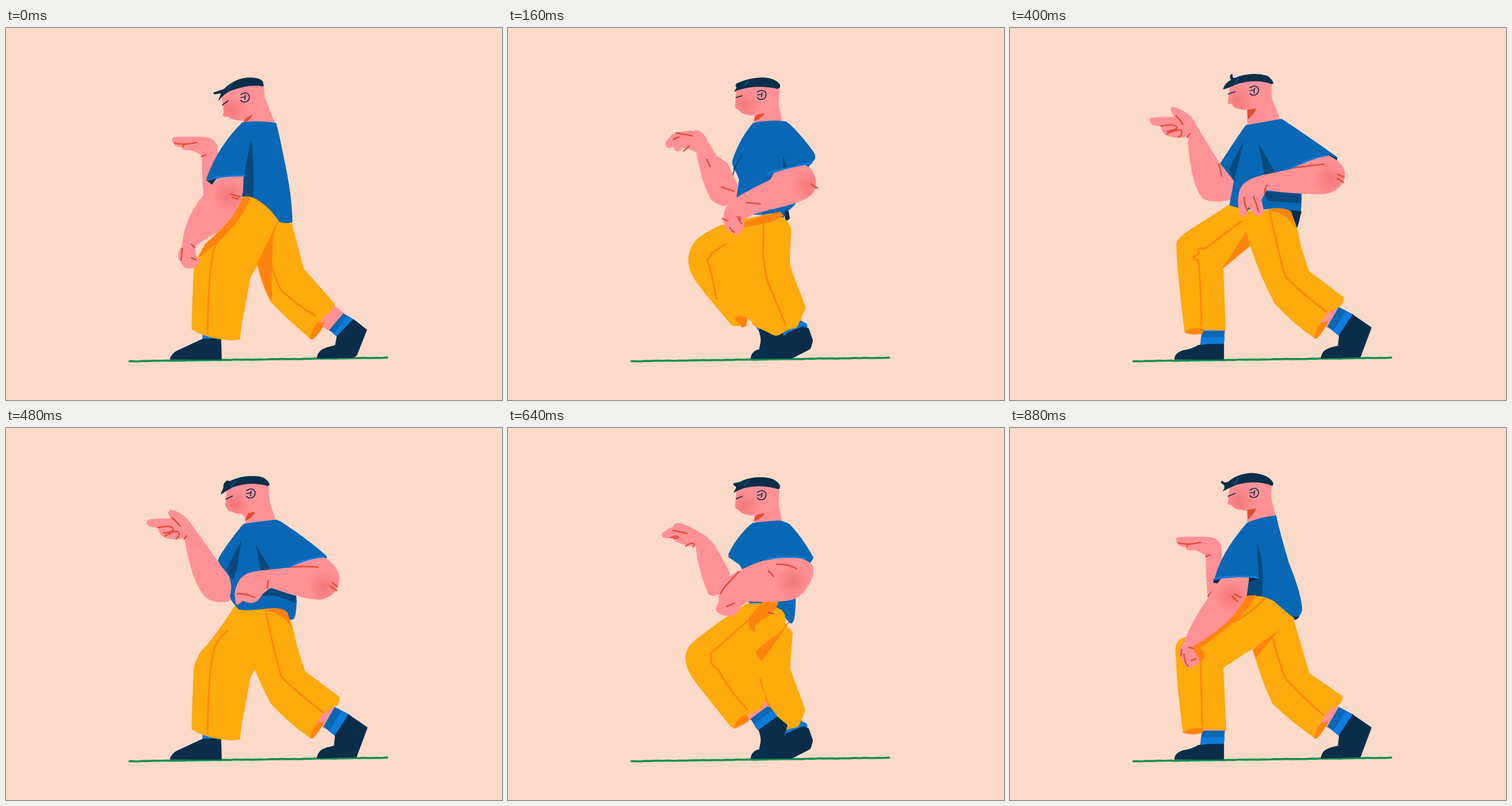
Write an HTML page with a canvas that moves like this. It is 864x648 px and loops after 960 ms.

```html
<!DOCTYPE html>
<html lang="en">
<head>
<meta charset="utf-8">
<title>Walk cycle</title>
<style>
html, body { margin: 0; width: 100%; height: 100%; overflow: hidden; background: #fbdac9; }
canvas { display: block; width: 864px; height: 648px; }
</style>
</head>
<body>
<canvas id="stage" width="864" height="648"></canvas>
<script>
const ctx = document.getElementById('stage').getContext('2d');
const STEP = 80;
const C = {
  paper: '#fbdac9', skin: '#fe9196', red: '#e44b35', blue: '#0868b6', dark: '#084a7e',
  light: '#0e7bdb', navy: '#0a2e4a', yellow: '#fcaa0c', orange: '#ff840e', green: '#12914e'
};

// Feet, by phase of the step
const plant = {
  ankle: 'M336,516L374,516L374,530L336,530Z', sock: 'M335,528L373,528L372,552L332,553Z',
  stripe: 'M334,540L373,539L372,552L332,553Z',
  shoe: 'M287,577Q288,566 302,562Q318,560 328,553L350,551L372,551L372,577Z'
};
const flat = {
  stripe: 'M343,532L374,532L373,543L343,543Z',
  shoe: 'M286,577Q290,566 300,562L343,542L374,541L375,577Z'
};
const push = {
  ankle: 'M532,508L553,475L577,490L556,523Z', sock: 'M554,520L573,487L598,500L575,537Z',
  stripe: 'M564,528L585,494L598,500L575,537Z',
  shoe: 'M542,575Q544,561 560,557L572,554L574,535L597,500L629,522L610,573Z'
};
const pushLow = {
  ...push, ankle: 'M532,508L558,474L588,497L564,527Z', sock: 'M564,526L588,498L604,508L578,538Z',
  stripe: 'M572,532L595,502L604,508L578,538Z',
  shoe: 'M542,575Q544,561 560,557L574,553L577,537L605,508L628,526L611,569Q607,574 602,574Z'
};
const strip = 'M410,530L455,530L455,537L411,537Z';
const stand = {
  ankle: strip, sock: strip, stripe: strip,
  shoe: 'M338,576Q339,565 350,563L374,562L411,537L454,536L454,576Z'
};
const swing = {
  ankle: 'M472,484L496,448L526,467L502,504Z', sock: 'M501,503L525,468L542,477L516,516Z',
  stripe: 'M509,509L533,473L542,477L516,516Z',
  shoe: 'M545,574Q546,563 550,558L516,514L542,478L569,486L568,574Z'
};
const swingLow = {
  ...swing, ankle: 'M472,484L496,448L518,461L494,497Z', sock: 'M494,496L517,461L542,477L516,514Z',
  stripe: 'M504,504L528,467L542,477L516,514Z'
};
const reach = {
  ankle: 'M348,509L390,501L391,512L351,521Z', sock: 'M353,518L391,510L396,530L358,539Z',
  stripe: 'M355,529L394,520L396,530L358,539Z',
  shoe: 'M321,576Q322,563 334,560L349,557Q356,553 358,538L396,529L404,549Q393,566 378,576Z'
};
const trail = {
  ankle: 'M526,512L558,480L572,488L540,519Z', sock: 'M538,517L571,489L587,504L553,537Z',
  stripe: 'M546,527L579,496L587,504L553,537Z',
  shoe: 'M509,575Q510,562 524,557L548,551L554,536L586,504L607,529L577,574Z'
};

// Heads
const headLow = {
  skin: 'M376,115L380,148L378,152Q381,155 386,153Q395,162 415,160L416,167L468,167L450,120L448,98Q415,88 390,104Z',
  chin: 'M415,164Q416,158 420,157L428,152Q425,160 415,164Z',
  hair: 'M371,125Q377,112 374,113L363,115L362,113L380,107Q400,87 425,87Q442,87 447,94L448,101Q425,96 390,109Q378,115 371,125Z',
  shine: 'M387,107L394,97', eye: 'M377,134L387,127', ear: [416, 121], blush: [393, 143]
};
const headMid = {
  skin: 'M387,112L385,149Q388,152 391,150Q396,157 420,157L422,166L469,166L459,132L460,99Q420,92 386,112Z',
  chin: 'M421,163L423,159L438,152Q435,161 421,163Z',
  hair: 'M380,120Q385,113 380,111Q395,99 410,94Q445,83 460,99L458,103Q420,99 395,110Q385,114 380,120Z',
  shine: 'M395,106L402,99', eye: 'M385,128L397,124', ear: [427, 118], blush: [399, 138]
};
const headNod = {
  ...headMid,
  hair: 'M378,123Q385,109 374,108L374,106Q385,105 389,100Q405,87 440,88Q455,91 459,101L457,104Q425,96 395,108Q384,115 378,123Z',
  eye: 'M386,133L397,126', ear: [427, 119], blush: [400, 141]
};
const headBack = {
  skin: 'M411,97L407,131Q410,133 413,131Q416,146 440,147L436,170L487,166L482,132Q485,118 485,103Q455,90 420,94Z',
  chin: 'M437,160L439,148L454,146Q445,155 437,160Z',
  hair: 'M410,100L416,93L411,90L411,88Q430,83 455,84Q483,87 488,103L486,108Q465,100 440,99Q420,99 410,100Z',
  shine: 'M428,95L435,85', eye: 'M409,114L419,112', ear: [456, 115], blush: [424, 129]
};
const headUp = {
  skin: 'M384,101L380,131Q383,133 386,131Q390,142 414,142L414,173L471,162L455,122L455,95Q425,84 396,94Z',
  chin: 'M415,158L414,143L428,141Q424,150 415,158Z',
  hair: 'M372,106Q376,95 386,91Q382,84 386,81L387,81Q386,87 391,88Q420,76 448,84Q457,91 458,96L456,97Q430,87 395,97Q380,104 372,106Z',
  shine: 'M391,98L398,87', eye: 'M380,115L392,111', ear: [425, 109], blush: [397, 126]
};
const headLift = {
  ...headUp,
  skin: 'M383,101L380,132Q383,135 386,133Q390,143 414,143L414,168L463,156L454,122L455,97Q425,86 396,94Z',
  hair: 'M372,109Q378,100 369,96Q367,93 370,93Q373,98 381,94Q395,81 420,79Q452,81 458,97L457,100Q430,89 395,98Q378,105 372,109Z',
  eye: 'M380,119L392,114', ear: [425, 113], blush: [400, 127]
};

const palmUp = {
  skin: 'M342,222Q328,212 318,212Q308,214 306,207Q292,206 293,199Q287,196 292,191Q330,189 350,191Q362,193 367,205L368,215L372,280L345,293Q342,260 342,222Z',
  lines: 'M293,200Q310,205 332,199M308,207Q308,203 315,202M341,224L348,221M345,293L365,272'
};

const contactNear = {
  farArm: palmUp,
  farLeg: {
    ...pushLow,
    cuff: 'M530,541Q533,524 543,513L555,513Q548,530 534,542Z',
    pants: 'M474,334Q485,342 497,340Q505,370 518,420L545,450L572,481L569,488L543,514Q535,525 531,541Q497,513 462,477Q446,448 438,410Z',
    shade: 'M466,352L438,410Q448,450 462,474Q461,410 466,352Z',
    seam: 'M462,405Q462,420 478,455Q505,482 539,501'
  },
  head: headLow,
  body: {
    shirt: 'M412,165Q440,161 470,166Q474,180 484,230Q498,295 498,338Q485,341 474,336Q455,320 431,300L408,295L414,258L353,268L350,262Q371,205 412,165Z',
    dark: 'M427,197Q432,240 430,296L410,292Q416,250 427,197Z',
    navy: 'M350,265L367,261L362,274Z', hem: 'M352,265Q370,257 416,257'
  },
  nearLeg: {
    ...flat,
    pants: 'M408,296Q418,292 430,296Q455,308 474,336L436,415L425,434L413,500Q408,525 407,542Q395,545 370,541Q340,535 324,524Q325,480 328,415Q335,398 340,390Q370,358 408,296Z',
    shade: 'M408,298L424,294Q420,320 380,362Q360,380 338,398Q342,378 360,366Q392,340 408,298ZM474,336L467,355L437,412L464,357Z',
    seam: 'M386,353Q364,370 360,395Q352,440 351,533'
  },
  nearArm: {
    skin: 'M367,263Q390,257 413,259L412,285Q409,305 400,318Q388,338 371,352L329,379L330,398Q337,402 336,408Q332,412 329,415Q322,420 312,417Q306,413 306,405Q301,405 301,398Q301,388 307,381Q311,340 331,310Q340,295 346,292Z',
    lines: 'M307,384L305,405M323,377L329,382M323,400L331,404M391,289L407,294M394,295L404,298',
    blush: [389, 292]
  }
};

const passNear = {
  farArm: {
    skin: 'M345,225Q330,212 320,212Q308,214 307,207Q293,206 295,200Q289,196 295,192Q330,189 350,191Q365,197 370,215L383,248L404,252L402,300L368,316Q351,290 345,225Z',
    lines: 'M294,200Q310,204 335,198M309,207Q310,203 316,202M341,224L351,222M382,249L388,277M367,315L397,300'
  },
  farLeg: {
    ...swing,
    cuff: 'M465,486L475,483L486,496Q478,510 466,519Z',
    pants: 'M350,375Q313,392 314,412Q316,430 330,441L368,469L467,518L474,484L505,449L504,444L466,416L400,370Z',
    shade: 'M466,416L471,432L464,475Z', seam: 'M376,393L362,432'
  },
  head: headMid,
  body: {
    shirt: 'M421,163Q445,160 472,163Q480,190 491,235L497,260Q507,300 505,322Q504,334 498,337L478,330L440,340L400,335L398,300L403,260Q402,200 421,163Z',
    dark: 'M405,218Q388,232 384,248L403,251ZM485,237L497,268L494,295Z',
    navy: 'M405,278L428,270L430,288L398,300ZM480,318L487,330L478,328Z', hem: 'M404,274Q440,263 485,261'
  },
  nearLeg: {
    ...stand,
    pants: 'M365,358L480,326L493,338L472,390Q465,410 466,440L467,531L378,533Q373,532 373,525L369,468L362,430L376,393L345,395Z',
    shade: 'M379,371L386,354L480,325L493,333Q470,345 440,354Q410,364 379,371ZM376,393L362,430L367,468Q366,430 376,393Z',
    seam: 'M438,352Q432,390 422,405Q423,460 430,531'
  },
  nearArm: {
    skin: 'M428,270Q460,262 484,260Q493,280 492,298Q490,318 465,327L390,352L361,365Q355,375 345,385L358,393Q361,398 356,402Q345,403 335,403Q329,402 328,390Q319,372 326,362Q335,340 355,330Q390,308 430,288Z',
    lines: 'M326,364L322,376M329,384Q330,398 334,403M337,382L344,384M344,398L348,393M358,360L363,364M474,302L483,314M477,300L491,308',
    blush: [474, 300]
  }
};

const reachFar = {
  farArm: {
    skin: 'M313,207Q295,203 283,200L284,214Q280,218 273,214L272,205L264,213Q257,214 257,208L266,186L252,190Q245,189 248,182Q265,169 293,166Q287,158 294,155Q308,153 315,161Q345,205 376,238L405,265L400,297Q375,308 352,301Q330,280 313,207Z',
    lines: 'M292,165Q303,167 307,178M268,182L280,178M271,204L280,190M311,209L316,205M377,239L389,268'
  },
  farLeg: {
    ...reach,
    cuff: 'M326,525Q335,516 352,515L356,523Z',
    pants: 'M395,312L330,340Q286,362 284,392Q285,410 300,455L326,524L353,515L398,508L366,410L419,383L425,315Z',
    shade: 'M404,333L420,381L367,410Q390,370 404,333Z',
    seam: 'M401,346L338,379Q333,388 336,391Q322,392 325,400Q345,440 364,511'
  },
  head: headBack,
  body: {
    shirt: 'M434,169Q460,161 490,163Q530,170 578,208L577,216L498,234L505,245L497,290L494,335L489,341L485,318Q470,308 425,316L397,312L404,265L377,238Q400,195 434,169Z',
    dark: 'M412,222L399,264L383,242ZM474,215L482,250L470,252ZM465,284L497,283L497,298L462,288Z',
    navy: 'M560,212L575,206L579,212L577,220ZM486,318L494,318L493,335L489,341ZM500,234L506,242L480,249Z',
    hem: 'M500,233Q540,220 573,209'
  },
  nearLeg: {
    ...trail,
    cuff: 'M512,541Q508,530 515,520Q525,511 537,511L543,518Q532,535 512,541Z',
    pants: 'M400,312Q440,320 470,310Q484,310 485,318Q492,370 512,422L569,486L540,512Q520,515 512,540Q506,540 502,530L448,462Q428,420 418,380L404,334Z',
    shade: 'M438,322L450,318L467,316L460,326Z',
    seam: 'M452,322Q460,370 479,430L537,502'
  },
  nearArm: {
    skin: 'M500,236Q530,222 562,212Q587,225 589,250Q588,269 545,277L500,282L468,281L461,298Q465,312 463,319L452,320Q440,330 425,312L416,296Q415,283 421,276Q450,255 500,236Z',
    lines: 'M505,244L557,237M418,279L432,268M470,276L466,285M429,297Q432,312 440,318M441,296Q446,312 452,318M582,240L589,242M583,248L588,250',
    blush: [572, 251]
  }
};

const contactFar = {
  farArm: {
    skin: 'M310,188Q290,194 272,186Q263,178 264,171L248,168Q241,160 246,157Q265,155 288,155Q277,142 283,138Q300,141 315,155Q345,205 365,236L391,266L385,298Q350,306 335,295Q315,270 310,188Z',
    lines: 'M289,153Q295,158 301,168M263,171Q290,165 291,175Q285,178 274,180M274,184Q292,176 298,178Q302,186 294,190M309,190L313,184M364,237L369,258'
  },
  farLeg: {
    ...plant,
    cuff: 'M305,530Q318,522 336,524L335,532Q318,535 305,530Z',
    pants: 'M383,308L325,345Q292,365 291,375Q289,400 305,530Q320,523 336,524L375,526L371,418L420,378L420,320Z',
    shade: 'M414,352L420,376L371,418Q390,390 414,352Z',
    seam: 'M403,337L340,384Q327,382 328,388Q332,394 320,398Q322,404 328,405Q334,470 333,520'
  },
  head: headUp,
  body: {
    shirt: 'M411,170Q440,165 473,159Q520,190 570,226L566,234L490,247L507,288Q508,325 500,347L490,320Q470,311 440,316Q410,318 383,308L391,266L367,236Q390,200 411,170Z',
    dark: 'M406,200L390,264L382,246ZM434,204L462,254L444,256ZM442,285L506,290L506,304L450,301Z',
    navy: 'M553,219L569,228L568,233ZM491,318L507,320L499,347Z', hem: 'M490,244Q525,226 554,221'
  },
  nearLeg: {
    ...push,
    cuff: 'M530,540Q533,525 543,514L553,512Q545,530 534,540Z',
    pants: 'M408,318Q440,322 455,316Q485,312 490,325Q500,345 506,380L520,424L580,469Q582,474 576,483L554,495Q535,515 532,540Q500,520 462,480Q435,430 418,375L412,350Z',
    shade: 'M455,315Q485,313 490,323L497,348Q488,325 455,318Z',
    seam: 'M452,317Q460,360 479,432Q500,455 552,495'
  },
  nearArm: {
    skin: 'M487,247Q525,228 552,221Q582,235 583,255Q580,284 545,289Q500,289 446,282L437,300L442,320Q438,327 428,326L415,310L411,325Q405,331 400,323Q396,300 400,285Q405,265 440,257Z',
    lines: 'M490,244L547,237M447,274L443,286M408,295Q408,308 414,318M424,293Q430,308 433,320M570,262L581,269M571,255L582,260',
    blush: [558, 263]
  }
};

const passFar = {
  farArm: {
    skin: 'M313,193Q290,200 274,190Q267,182 268,176L250,174Q243,168 248,163Q270,161 290,162Q281,150 290,147Q305,151 318,165Q345,195 369,227L400,265L396,303Q375,308 362,295Q330,262 313,193Z',
    lines: 'M290,160L305,173M267,176Q292,170 292,180Q288,186 275,186M280,192Q296,180 302,184Q306,190 298,196M311,197L316,192'
  },
  farLeg: {
    ...stand,
    pants: 'M430,330L495,345L467,410L467,532L378,533Q374,532 374,525L369,468L390,380Z',
    shade: 'M500,332L445,395L458,407L490,350Z', seam: 'M421,500L422,532'
  },
  head: headNod,
  body: {
    shirt: 'M418,165Q445,162 472,161Q520,190 553,226L500,240L505,300Q504,330 498,342Q490,320 465,308Q430,320 396,316L400,265L370,226Q390,190 418,165Z',
    dark: 'M412,197L408,246L400,264L387,247ZM438,206L458,240L446,242ZM440,278Q470,265 504,297L502,306Q480,285 462,280L435,285Z',
    navy: 'M495,330L505,328L503,339L496,342Z', hem: 'M500,239Q520,228 552,227'
  },
  nearLeg: {
    ...swingLow,
    cuff: 'M459,521Q462,500 475,484L487,493Q478,511 459,521Z',
    pants: 'M396,317Q430,319 465,305Q495,314 500,328L445,395L460,408L505,444L503,452L474,478Q462,500 460,520L452,520Q410,492 370,470Q317,432 315,410Q316,400 350,360Z',
    shade: 'M463,305Q492,312 501,328L497,340Q490,320 463,305ZM369,470L452,520L410,503L371,486Z',
    seam: 'M461,308Q430,340 384,390Q377,392 383,399Q375,404 383,409L400,412Q425,445 475,470'
  },
  nearArm: {
    skin: 'M498,241Q530,226 552,228Q577,245 578,270Q574,304 552,308Q520,305 475,272Q460,279 440,275L415,289Q400,292 396,290Q395,284 402,277Q397,272 402,262Q415,243 430,240Z',
    lines: 'M499,241Q525,240 540,248M467,257L467,271M398,283L404,276L429,262M412,287L434,271M561,289L571,297M566,284L571,292',
    blush: [552, 290]
  }
};

const reachNear = {
  farArm: {
    skin: 'M342,218Q325,207 312,206L300,205Q300,210 292,209L288,204L291,197L283,194Q279,190 283,186Q330,183 345,185Q360,191 364,205L373,240L345,292Q341,260 342,218Z',
    lines: 'M286,197L319,194M299,206L302,198M340,219L347,218'
  },
  farLeg: {
    ...trail,
    cuff: reachFar.nearLeg.cuff,
    pants: 'M455,350L490,342Q500,385 514,428L568,486L538,512Q520,515 513,540Q505,538 500,528L448,465Q430,425 420,385Z',
    shade: 'M477,346L418,386L425,403Q455,372 477,346Z',
    seam: 'M457,375Q470,410 480,437L530,505'
  },
  head: headBack,
  body: {
    shirt: 'M433,168Q460,162 490,163Q505,190 513,242L502,245Q497,280 494,335L488,342L430,300L420,225L397,220Q406,190 433,168Z',
    dark: 'M470,265L485,245L499,247Q490,285 475,304Q460,296 425,300Z',
    navy: 'M488,228L512,238L512,244L500,243L488,245ZM487,330L494,325L492,342L488,340Z',
    hem: 'M396,220Q450,215 487,228'
  },
  nearLeg: {
    ...reach,
    cuff: 'M327,525Q335,516 351,514L356,522Z',
    pants: 'M436,296Q460,290 480,308Q494,325 489,343Q480,355 450,375L418,388L368,411L396,502Q397,508 392,510L352,515L327,524Q305,470 284,400Q281,375 300,360L335,343L365,330Z',
    shade: 'M430,296Q455,290 466,300Q440,325 405,335Q375,341 362,350L361,372L350,368L352,338Z',
    seam: 'M404,338L333,388Q324,392 324,398Q335,440 358,510'
  },
  nearArm: {
    skin: 'M396,221Q445,215 487,228Q490,240 480,252Q460,278 430,295L360,331L352,340Q350,350 358,352L361,368Q352,373 347,368Q330,360 329,345Q330,338 335,330Q336,290 355,262Q375,235 396,221Z',
    lines: 'M436,234Q455,234 464,242M440,241Q452,242 458,247M343,294Q350,275 375,239M350,335L354,340M345,354L354,350',
    blush: [438, 247]
  }
};

const plantNear = {
  farArm: palmUp,
  farLeg: {
    ...push,
    cuff: contactFar.nearLeg.cuff,
    pants: 'M465,345L493,333L521,428L578,467Q580,472 574,480L555,492Q535,513 532,540Q495,515 458,480Q435,430 424,386Z',
    shade: 'M423,386L472,348L440,385L428,399Z',
    seam: 'M458,368Q468,405 479,435Q500,460 546,500'
  },
  head: headLift,
  body: {
    shirt: 'M413,166Q435,156 463,153Q470,185 485,235Q509,295 508,318Q505,329 495,332Q480,328 470,318L445,298L408,295L414,259L356,268Q366,220 413,166Z',
    dark: 'M431,203Q443,240 438,295L409,292L415,262L434,262Z',
    navy: 'M355,263L368,261L362,270L355,269ZM416,259L432,261L418,268ZM490,330L503,329Q498,335 492,333Z',
    hem: 'M355,264Q390,255 433,261'
  },
  nearLeg: {
    ...plant,
    cuff: 'M302,530Q318,522 336,524L335,530Q318,536 302,530Z',
    pants: 'M408,295Q440,289 460,303Q485,325 495,332Q490,340 470,350L420,385L371,417L376,526L336,524Q318,522 302,530Q292,460 289,385Q290,370 302,366Q360,350 408,295Z',
    shade: 'M409,293L428,292Q418,315 380,345Q355,365 330,383Q342,393 337,402L327,407L318,380Q380,345 409,293Z',
    seam: 'M443,297Q430,315 390,338M332,405L335,520'
  },
  nearArm: {
    skin: 'M368,263L416,259L412,290Q400,315 375,340Q345,365 318,380L320,388L329,404Q329,411 322,412Q316,419 307,416Q297,402 296,390Q297,378 303,375Q316,340 345,297Q352,285 368,263Z',
    lines: 'M299,386L298,397M303,394Q304,408 310,415M312,382L320,384M324,402L316,405M387,293L396,302M391,289L402,295',
    blush: [386, 294]
  }
};

// In-betweens: walk both outlines evenly and average them
function sample(d, count) {
  const path = document.createElementNS('http://www.w3.org/2000/svg', 'path');
  path.setAttribute('d', d);
  const length = path.getTotalLength();
  return Array.from({ length: count + 1 }, (_, i) => path.getPointAtLength(length * i / count));
}
function blendPath(a, b) {
  const others = b.match(/M[^M]*/g);
  return a.match(/M[^M]*/g).slice(0, others.length).map((d, i) => {
    const ends = sample(others[i], 90);
    const points = sample(d, 90).map((p, k) => `${(p.x + ends[k].x) / 2},${(p.y + ends[k].y) / 2}`);
    return 'M' + points.join('L') + (d.endsWith('Z') ? 'Z' : '');
  }).join('');
}
function blend(a, b) {
  if (typeof a === 'string') return blendPath(a, b);
  if (Array.isArray(a)) return a.map((v, i) => (v + b[i]) / 2);
  return Object.fromEntries(Object.keys(a).filter(k => k in b).map(k => [k, blend(a[k], b[k])]));
}

const settle = {
  ...blend(contactFar, passFar),
  farLeg: { ...contactNear.nearLeg, shade: '' },
  nearLeg: contactFar.nearLeg
};
const poses = [
  contactNear, passNear, blend(passNear, reachFar), reachFar, blend(reachFar, contactFar), contactFar,
  settle, passFar, blend(passFar, reachNear), reachNear, blend(reachNear, plantNear), plantNear
];

function line(d, color, width) {
  if (!d) return;
  ctx.strokeStyle = color;
  ctx.lineWidth = width;
  ctx.stroke(new Path2D(d));
}
// The thin outline softens corners and closes seams between neighbours
function fill(d, color) {
  if (!d) return;
  ctx.fillStyle = color;
  ctx.fill(new Path2D(d));
  line(d, color, 1.6);
}
function blush(outline, [x, y], radius) {
  const glow = ctx.createRadialGradient(x, y, 2, x, y, radius);
  glow.addColorStop(0, 'rgba(232,84,80,.4)');
  glow.addColorStop(0.5, 'rgba(236,94,90,.26)');
  glow.addColorStop(1, 'rgba(240,100,96,0)');
  ctx.save();
  ctx.clip(new Path2D(outline));
  ctx.fillStyle = glow;
  ctx.fillRect(x - radius, y - radius, radius * 2, radius * 2);
  ctx.restore();
}

function drawLeg(leg) {
  fill(leg.ankle, C.skin);
  fill(leg.sock, C.blue);
  fill(leg.stripe, C.light);
  fill(leg.shoe, C.navy);
  fill(leg.pants, C.yellow);
  fill(leg.cuff, C.orange);
  fill(leg.shade, C.orange);
  line(leg.seam, C.orange, 3);
}
function drawArm(arm) {
  fill(arm.skin, C.skin);
  if (arm.blush) blush(arm.skin, arm.blush, 30);
  line(arm.lines, C.red, 2.6);
}
function drawHead(head) {
  fill(head.skin, C.skin);
  blush(head.skin, head.blush, 27);
  fill(head.chin, C.red);
  fill(head.hair, C.navy);
  line(head.shine, C.dark, 3);
  line(head.eye, C.navy, 1.7);
  ctx.save();
  ctx.translate(...head.ear);
  line('M-7,-5Q-3,-8 1,-8Q8,-7 8,0Q7,8 -1,8Q-5,8 -7,5M-7,0L1,-1M1,-4L0,4', C.navy, 1.7);
  ctx.restore();
}
function drawBody(body) {
  fill(body.shirt, C.blue);
  fill(body.dark, C.dark);
  fill(body.navy, C.navy);
}
function drawGround() {
  let d = 'M215,580.5';
  for (let x = 220; x <= 669; x += 6) {
    const y = 580.5 - (x - 214) * 0.0138 + Math.sin(x * 0.31) * 0.2 + Math.sin(x * 0.09) * 0.2;
    d += `L${x},${y}`;
  }
  line(d, C.green, 3.6);
}

function draw(pose) {
  ctx.fillStyle = C.paper;
  ctx.fillRect(0, 0, 864, 648);
  ctx.lineCap = ctx.lineJoin = 'round';
  drawGround();
  drawArm(pose.farArm);
  drawLeg(pose.farLeg);
  drawHead(pose.head);
  drawBody(pose.body);
  drawLeg(pose.nearLeg);
  drawArm(pose.nearArm);
  line(pose.body.hem, C.light, 3);
}

const start = performance.now();
function tick() {
  draw(poses[Math.floor((performance.now() - start) / STEP) % poses.length]);
  requestAnimationFrame(tick);
}
tick();
</script>
</body>
</html>
```
